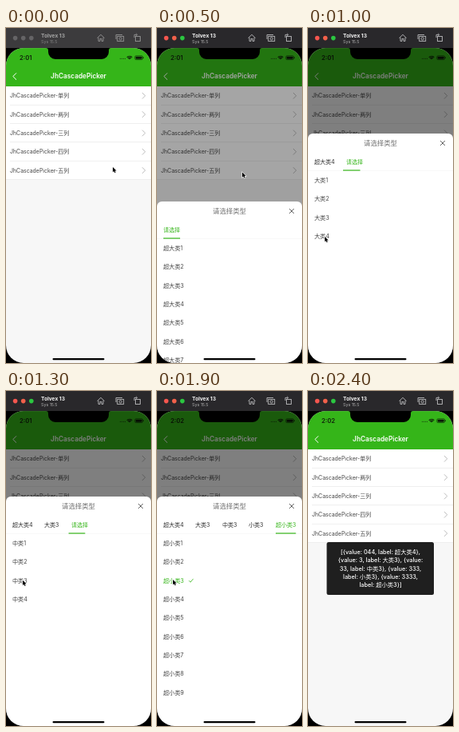
Recreate the animation shown at these times as an HTML page with a canvas. Size 182 by 419 pixels, loop 2500 ms.

```html
<!DOCTYPE html>
<html lang="zh-CN">
<head>
<meta charset="utf-8">
<style>
html, body { margin: 0; width: 100%; height: 100%; overflow: hidden; background: #000; }
canvas { display: block; width: 182px; height: 419px; }
</style>
</head>
<body>
<canvas id="stage"></canvas>
<script>
const W = 182, H = 419, LOOP = 2500, STEP = 100;
const FONT = 'Inter, "Noto Sans CJK SC", "Noto Sans CJK", sans-serif';
const GREEN = '#35b519', INK = '#444', ROW = 23.33;
const TOP = 25.1, BAR_END = 73.1;
const canvas = document.getElementById('stage');
const dpr = window.devicePixelRatio || 1;
canvas.width = W * dpr;
canvas.height = H * dpr;
const c = canvas.getContext('2d');

// Each level: when it opens, its item prefix, item count and the chosen label
const levels = [
  { at: 0, name: '超大类', count: 9, pick: '超大类4' },
  { at: 900, name: '大类', count: 4, pick: '大类3' },
  { at: 1200, name: '中类', count: 4, pick: '中类3' },
  { at: 1500, name: '小类', count: 4, pick: '小类3' },
  { at: 1700, name: '超小类', count: 9, pick: '超小类3' }
];
const tabX = [8, 48, 82, 115, 149];
const DONE = 1900;
// time, x, y
const path = [
  [0, 134, 174], [400, 107.5, 180.5], [500, 107, 180.5], [700, 61, 234],
  [900, 21, 261], [1000, 21, 261], [1200, 21, 237], [1500, 21, 236], [1900, 20, 236]
];

const clamp = v => Math.max(0, Math.min(1, v));
const easeOut = v => 1 - Math.pow(1 - clamp(v), 3);
const mix = (a, b, k) => a + (b - a) * k;

function rect(x, y, w, h, color) {
  c.fillStyle = color;
  c.fillRect(x, y, w, h);
}

function round(x, y, w, h, r, color) {
  c.beginPath();
  c.roundRect(x, y, w, h, r);
  c.fillStyle = color;
  c.fill();
}

function dot(x, y, r, color) {
  c.beginPath();
  c.arc(x, y, r, 0, 7);
  c.fillStyle = color;
  c.fill();
}

function line(points, color, width) {
  c.beginPath();
  points.forEach(([x, y], i) => i ? c.lineTo(x, y) : c.moveTo(x, y));
  c.strokeStyle = color;
  c.lineWidth = width;
  c.stroke();
}

function text(s, x, y, size, color, weight = 400, align = 'left') {
  c.font = `${weight} ${size}px ${FONT}`;
  c.textAlign = align;
  c.fillStyle = color;
  c.fillText(s, x, y + size * 0.36);
}

function textWidth(s, size) {
  c.font = `400 ${size}px ${FONT}`;
  return c.measureText(s).width;
}

function windowBar(active) {
  rect(0, 0, W, 25.5, active ? '#29282b' : '#3c3b3d');
  const lights = active ? ['#f4564f', '#f0604a', '#2bc640'] : ['#656466', '#656466', '#656466'];
  lights.forEach((color, i) => dot(11.6 + i * 10.1, 12.6, 2.8, color));
  text('Tolvex 13', 44, 9.3, 6.6, active ? '#f4f4f4' : '#a4a4a4', 700);
  text('Sys 15.5', 44, 16.8, 5.3, active ? '#b0b0b0' : '#828282');
  const ink = active ? '#b9b9bb' : '#949494';
  line([[114.5, 12.5], [119, 8.3], [123.5, 12.5]], ink, 0.9);
  line([[116, 12], [116, 16.4], [118, 16.4], [118, 13.5], [120, 13.5], [120, 16.4], [122, 16.4], [122, 12]], ink, 0.9);
  line([[138, 14], [138, 8.5], [146, 8.5]], ink, 0.9);
  c.strokeStyle = ink;
  c.lineWidth = 0.9;
  c.strokeRect(139.7, 10.4, 8, 6);
  c.beginPath();
  c.arc(143.7, 13.4, 1.6, 0, 7);
  c.stroke();
  c.strokeRect(162.5, 10.5, 6, 6);
  line([[161, 12], [161, 8.4], [164.5, 8.4]], ink, 0.9);
  line([[163.2, 6.8], [164.8, 8.4], [163.2, 10]], ink, 0.8);
}

function statusBar(t) {
  text(t < 1700 ? '2:01' : '2:02', 17, 37, 7.6, '#10200c', 600);
  for (let i = 0; i < 4; i++) dot(143.5 + i * 2, 38.3, 0.6, '#173d0d');
  for (let i = 1; i < 4; i++) {
    c.beginPath();
    c.arc(155, 39.7, i * 1.5, -Math.PI * 0.76, -Math.PI * 0.24);
    c.strokeStyle = '#0c1b08';
    c.lineWidth = 1.1;
    c.stroke();
  }
  c.beginPath();
  c.roundRect(161.8, 34.8, 9.8, 4.8, 1.4);
  c.lineWidth = 0.6;
  c.stroke();
  round(162.7, 35.7, 8, 3, 0.7, '#0c1b08');
  rect(172.2, 36.4, 0.7, 1.6, '#0c1b08');
}

function home(t) {
  rect(0, TOP, W, H, '#f7f7f7');
  rect(0, TOP, W, BAR_END - TOP, GREEN);
  statusBar(t);
  line([[13, 56.3], [8.8, 60.5], [13, 64.7]], '#fff', 1);
  text('JhCascadePicker', 91, 60.5, 8.25, '#fff', 600, 'center');
  rect(0, BAR_END, W, 5 * ROW, '#fff');
  [...'单两三四五'].forEach((ch, i) => {
    const y = BAR_END + (i + 0.5) * ROW;
    text(`JhCascadePicker-${ch}列`, 5, y + 0.2, 6.95, INK);
    line([[171, y - 3.8], [174.7, y], [171, y + 3.8]], '#b5b5b5', 0.9);
    rect(i < 4 ? 5 : 0, y + ROW / 2 - 0.5, W, 0.5, '#dedede');
  });
}

function tabBar(t, level) {
  const since = t - levels[level].at;
  // The highlight moves on one step after a new tab appears
  const active = level && since < STEP ? level - 1 : level;
  const labels = levels.slice(0, level + 1).map((l, i) =>
    i < level || t >= DONE ? l.pick : '请选择');
  labels.forEach((s, i) => text(s, tabX[i], 167, 7, i === active ? GREEN : '#2e2e2e'));
  rect(0, 178.2, W, 0.5, '#f0f0f0');
  const from = Math.max(0, level - 1);
  const k = level ? (since < STEP ? 0 : since < 2 * STEP ? 0.9 : 1) : 1;
  const x = mix(tabX[from], tabX[level], k);
  const w = mix(textWidth(labels[from], 7), textWidth(labels[level], 7), k);
  rect(x, 177.4, w, 1.2, GREEN);
}

function sheet(t, open) {
  rect(0, TOP, W, H, `rgba(0,0,0,${0.5 * open})`);
  c.save();
  c.translate(0, (1 - open) * 287);
  round(0, 132, W, 300, [6, 6, 0, 0], '#fff');
  text('请选择类型', 91, 144.3, 8.4, '#707070', 400, 'center');
  line([[166, 141], [172, 147]], '#555', 0.9);
  line([[172, 141], [166, 147]], '#555', 0.9);
  let level = 0;
  levels.forEach((l, i) => { if (t >= l.at) level = i; });
  tabBar(t, level);
  const { name, count } = levels[level];
  for (let i = 0; i < count; i++) {
    const y = 190.5 + i * ROW;
    const chosen = t >= DONE && i === 2;
    text(name + (i + 1), 8, y, 7.1, chosen ? GREEN : INK);
    if (chosen) line([[40, y], [42, y + 2], [45.5, y - 2.3]], GREEN, 0.8);
  }
  c.restore();
}

function toast(alpha) {
  c.save();
  c.globalAlpha = alpha;
  round(23.5, 189, 134.5, 66, 2.5, '#1f1f1f');
  [
    '[{value: 044, label: 超大类4},',
    '{value: 3, label: 大类3}, {value:',
    '33, label: 中类3}, {value: 333,',
    'label: 小类3}, {value: 3333,',
    'label: 超小类3}]'
  ].forEach((s, i) => text(s, 91, 201.3 + i * 10.3, 7.3, '#fff', 500, 'center'));
  c.restore();
}

// Display cut-out with small flared shoulders
function notch() {
  const l = 53, r = 129, bottom = 39, flare = 3, corner = 9;
  c.beginPath();
  c.moveTo(l - flare, TOP - 1);
  c.lineTo(l - flare, TOP);
  c.quadraticCurveTo(l, TOP, l, TOP + flare);
  c.arcTo(l, bottom, l + corner, bottom, corner);
  c.arcTo(r, bottom, r, bottom - corner, corner);
  c.lineTo(r, TOP + flare);
  c.quadraticCurveTo(r, TOP, r + flare, TOP);
  c.lineTo(r + flare, TOP - 1);
  c.fillStyle = '#000';
  c.fill();
}

function cursor(t) {
  let i = 0;
  while (i < path.length - 2 && t >= path[i + 1][0]) i++;
  const [t0, x0, y0] = path[i], [t1, x1, y1] = path[i + 1];
  const k = clamp((t - t0) / (t1 - t0));
  c.save();
  c.translate(mix(x0, x1, k), mix(y0, y1, k));
  c.beginPath();
  [[0, 0], [0, 6.3], [1.5, 5], [2.5, 7.3], [3.6, 6.8], [2.7, 4.6], [4.6, 4.5]]
    .forEach(([x, y]) => c.lineTo(x, y));
  c.closePath();
  c.strokeStyle = '#fff';
  c.lineWidth = 1.1;
  c.stroke();
  c.fillStyle = '#000';
  c.fill();
  c.restore();
}

function draw(t) {
  c.setTransform(dpr, 0, 0, dpr, 0, 0);
  rect(0, 0, W, H, '#000');
  windowBar(t >= 200);
  rect(0, TOP, W, H, '#000');
  c.save();
  c.beginPath();
  c.roundRect(0, TOP, W, H - TOP, 22);
  c.clip();
  home(t);
  const open = t < DONE ? easeOut((t - 400) / 300) : 1 - easeOut((t - DONE) / 300);
  if (open > 0) sheet(t, open);
  if (t > 2100) toast(clamp((t - 2100) / 200));
  notch();
  round(58.5, 412.9, 65, 2.4, 1.2, '#000');
  c.restore();
  if (t < 2200) cursor(t);
}

function tick() {
  const t = performance.now() % LOOP;
  draw(Math.floor(t / STEP) * STEP);
  requestAnimationFrame(tick);
}
tick();
</script>
</body>
</html>
```
